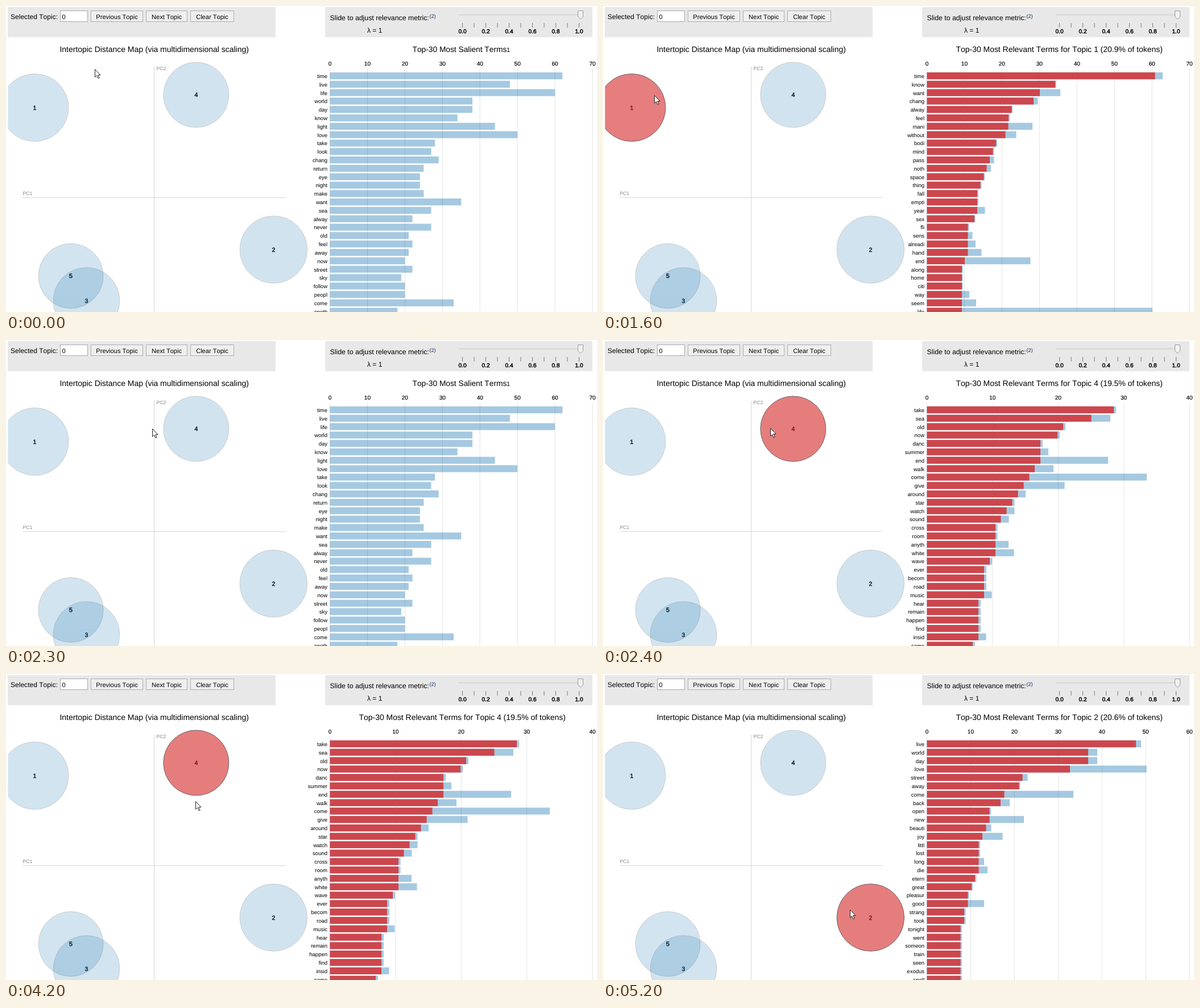
Write an HTML page that moves like this. It is 1039 by 539 pixels and loops after 6.9 s.

```html
<!DOCTYPE html>
<html lang="en">
<head>
<meta charset="utf-8">
<title>Topic map</title>
<style>
html, body { margin: 0; width: 100%; height: 100%; overflow: hidden; background: #fff; }
svg { display: block; }
text { font-family: "Liberation Sans", Arial, sans-serif; font-kerning: none; text-rendering: geometricPrecision; }
.dot { fill: #1f77b4; stroke: #000; opacity: .2; }
.dot.on { fill: #d62728; opacity: .6; }
</style>
</head>
<body>
<svg id="stage" width="1039" height="539" viewBox="0 0 1039 539">
  <defs><clipPath id="mapClip"><rect x="3.5" y="60" width="530" height="479"/></clipPath></defs>
</svg>
<script>
const stage = document.getElementById('stage');
const LOOP = 6900, X0 = 569.5, X1 = 1031, ROW = 14.81;

function add(parent, tag, attrs, text) {
  const el = document.createElementNS('http://www.w3.org/2000/svg', tag);
  for (const k in attrs) el.setAttribute(k, attrs[k]);
  if (text !== undefined) el.textContent = text;
  parent.appendChild(el);
  return el;
}
const rect = (p, x, y, width, height, fill, more) => add(p, 'rect', { x, y, width, height, fill, ...more });
const line = (p, x1, y1, x2, y2, stroke) => add(p, 'line', { x1, y1, x2, y2, stroke });
const label = (p, x, y, size, str, more) => add(p, 'text', { x, y, 'font-size': size, ...more }, str);
const mid = { 'text-anchor': 'middle' };
const heavy = { ...mid, stroke: '#000', 'stroke-width': .5 };

// Control panels
function button(x, w, str) {
  rect(stage, x + .5, 8.5, w, 19, '#efefef', { stroke: '#adadad' });
  label(stage, x + w / 2 + .5, 22.5, 11.1, str, mid);
}
rect(stage, 3, 2, 471, 53, '#e8e8e8');
rect(stage, 561, 2, 470, 53, '#e8e8e8');
label(stage, 8, 23, 12.05, 'Selected Topic:');
rect(stage, 95.5, 8.5, 48, 19, '#fff', { stroke: '#a9a9a9' });
label(stage, 98.5, 22.5, 11.1, '0');
button(149, 91, 'Previous Topic');
button(246, 72, 'Next Topic');
button(324, 76, 'Clear Topic');

label(stage, 569.5, 25, 12.3, 'Slide to adjust relevance metric:');
label(stage, 744.5, 20.5, 9, '(2)', { fill: '#0b2a5b' });
label(stage, 635, 47, 12, 'λ = 1');
rect(stage, 796, 14.5, 218, 2, '#d6d6d6');
add(stage, 'path', { d: 'M1005.5 8.5H1014.5V19L1010 23.5L1005.5 19Z', fill: '#f0f0f0', stroke: '#9a9a9a' });
for (let i = 0; i <= 10; i++) {
  const x = 802.5 + i * 20.5;
  line(stage, x, 30, x, 38, '#777');
  if (i % 2 === 0) label(stage, x, 48, 10, (i / 10).toFixed(1), heavy);
}

// Distance map
label(stage, 94.5, 81, 13.95, 'Intertopic Distance Map (via multidimensional scaling)');
const map = add(stage, 'g', { 'clip-path': 'url(#mapClip)' });
line(map, 29, 337.5, 491.5, 337.5, '#d6d6d6');
line(map, 260.5, 107, 260.5, 539, '#d6d6d6');
label(map, 29.5, 333, 8.7, 'PC1', { fill: '#858585' });
label(map, 264.5, 113, 8.7, 'PC2', { fill: '#858585' });

const dots = {};
[[1, 50.5, 179, 59.5], [2, 470.3, 429, 59.2], [3, 141.5, 519, 58.3], [4, 334.3, 156.5, 57.5], [5, 114, 475.5, 57]]
  .forEach(([n, cx, cy, r]) => {
    label(map, cx, cy + 3.8, 10.5, n, heavy);
    dots[n] = add(map, 'circle', { cx, cy, r, class: 'dot' });
  });

// Bar charts: salient rows hold a count, topic rows hold the right ends of both bars
const SALIENT = 'time 62,live 48,life 60,world 38,day 38,know 34,light 44,love 50,take 28,look 27,' +
  'chang 29,return 25,eye 24,night 24,make 25,want 35,sea 27,alway 22,never 27,old 21,feel 22,' +
  'away 21,now 20,street 22,sky 19,follow 20,peopl 20,come 33,anoth 18';
const TOPIC1 = 'time 970.5 984,know 795 797,want 768 804,chang 757 764.5,alway 718.5 720,feel 713 715,' +
  'mani 712.5 755,without 707.5 726.5,bodi 691 693,mind 685.5 687.5,pass 680 687.5,noth 674.5 682,' +
  'space 669.5 671,thing 663.5 665.5,fall 658 660,empti 658 660,year 658 671.5,sex 653 654.5,' +
  'fli 641.5 643.5,sens 641.5 649.5,alreadi 641.5 655,hand 641.5 665.5,end 636 751.5,along 631 632.5,' +
  'home 631 632.5,citi 631 632.5,way 631 644,seem 631 656,life 631 966';
const TOPIC4 = 'take 898 902,sea 858.5 892,old 809 813,now 799 803,danc 769 773,summer 769 783,' +
  'end 769 888,walk 759 792,come 749.5 956,give 739.5 811.5,around 729.5 743,star 719.5 723.5,' +
  'watch 709.5 723.5,sound 699.5 713.5,cross 690 693.5,room 690 693.5,anyth 690 713,white 690 722.5,' +
  'wave 680 684,ever 670 674,becom 670 674,road 670 674,music 670 683.5,hear 660 664,remain 660 664,' +
  'happen 660 664,find 660 664,insid 660 673.5,came 650 654';
const TOPIC2 = 'live 937 946,world 853 869,day 853 869,love 821 955.5,street 737.5 746.5,away 731.5 733.5,' +
  'come 705.5 827,back 699 715,open 679.5 682,new 679.5 740,beauti 673.5 682.5,joy 667 702.5,' +
  'littl 660.5 663,lost 660.5 663,long 660.5 670,die 660.5 676,etern 654 656.5,great 648 650,' +
  'pleasur 641.5 643.5,good 641.5 670,strang 635 637.5,took 635 637.5,tonight 628.5 631,went 628.5 631,' +
  'someon 628.5 631,train 628.5 631,seen 628.5 631,exodus 628.5 631,spell 628.5 631';

function chart(topic, max, share, table) {
  const g = add(stage, 'g', {}), step = (X1 - X0) / max * 10;
  const blue = add(g, 'g', {}), grid = add(g, 'g', {}), red = add(g, 'g', {});
  if (topic) {
    label(g, 620.5, 81, 13.95, `Top-30 Most Relevant Terms for Topic ${topic} (${share}% of tokens)`);
  } else {
    label(g, 714.5, 81, 13.75, 'Top-30 Most Salient Terms');
    label(g, 880, 81, 11, '1');
  }
  for (let v = 0; v <= max; v += 10) {
    const x = X0 + v / 10 * step;
    label(g, x, 104.5, 10, v, { ...mid, stroke: '#000', 'stroke-width': .2 });
    line(grid, x, 110, x, 539, 'rgba(0,0,0,.11)');
  }
  table.split(',').forEach((row, i) => {
    const [word, a, b] = row.split(' '), y = 116.9 + i * ROW;
    const end = topic ? +b : X0 + a / 10 * step;
    rect(blue, X0, y, end - X0, 12.2, '#a5c9e1');
    if (topic) rect(red, X0, y, a - X0, 12.2, '#cc474d');
    label(g, 565, y + 10, 9.5, word, { 'text-anchor': 'end' });
  });
  return g;
}
const charts = {
  0: chart(0, 70, 0, SALIENT),
  1: chart(1, 70, 20.9, TOPIC1),
  4: chart(4, 40, 19.5, TOPIC4),
  2: chart(2, 60, 20.6, TOPIC2)
};

const pointer = add(stage, 'path', {
  d: 'M.5 .5V14.2L3.6 11.4L6 16.6L8.1 15.7L5.8 10.6H10Z', fill: '#fff', stroke: '#222', 'stroke-width': 1
});

// Time in ms, then the state that begins there
const TOPICS = [[0, 0], [600, 1], [1800, 0], [2400, 4], [4300, 0], [4800, 2]];
const MOVES = [
  [0, 156, 111], [300, 154, 112], [400, 138, 120], [500, 112, 133], [600, 87, 144], [700, 72, 151], [800, 64, 156],
  [1500, 70, 157], [1600, 90, 157], [1700, 112, 157], [1800, 131, 157], [1900, 161, 157], [2000, 175, 156],
  [2100, 189, 156], [2200, 220, 156], [2300, 257, 156], [2400, 294, 155], [2500, 312, 155], [2600, 320, 156],
  [2700, 323, 157], [2800, 324, 158], [3700, 324, 161], [3800, 325, 167], [3900, 327, 177], [4000, 329, 190],
  [4100, 331, 206], [4200, 333, 224], [4300, 339, 240], [4400, 368, 301], [4500, 388, 332], [4600, 403, 358],
  [4700, 420, 382], [4800, 427, 395], [4900, 431, 406], [5000, 434, 415]
];
const at = (steps, t) => steps.findLast(s => s[0] <= t);

function draw(t) {
  const topic = at(TOPICS, t)[1], [, x, y] = at(MOVES, t);
  for (const n in charts) charts[n].style.display = n == topic ? '' : 'none';
  for (const n in dots) dots[n].classList.toggle('on', n == topic);
  pointer.setAttribute('transform', `translate(${x} ${y})`);
}

const start = performance.now();
function tick() {
  draw((performance.now() - start) % LOOP);
  requestAnimationFrame(tick);
}
tick();
</script>
</body>
</html>
```
